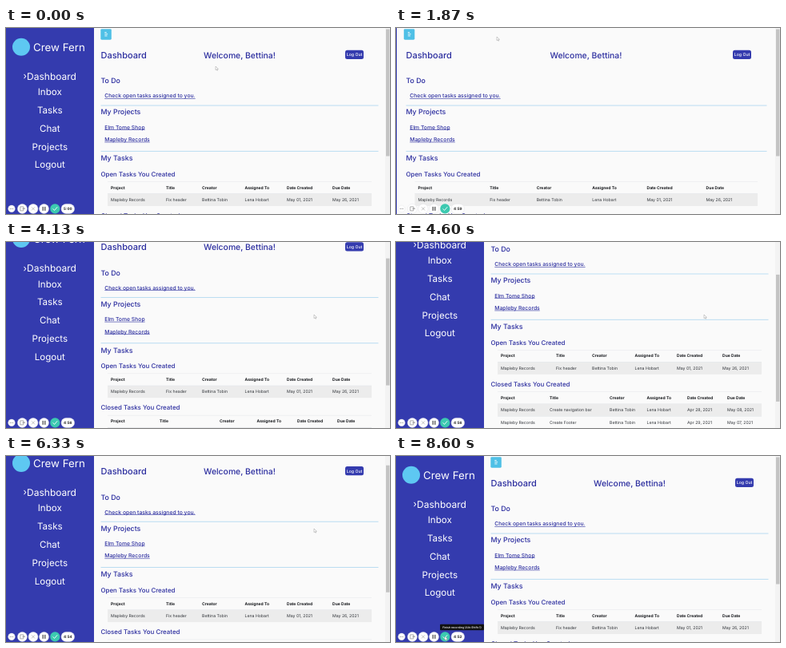
Recreate the animation shown at these times as an HTML page with a canvas. Size 480 by 233 pixels, loop 8670 ms.

```html
<!DOCTYPE html>
<html lang="en">
<head>
<meta charset="utf-8">
<title>Task dashboard</title>
<style>
  html, body { margin: 0; width: 100%; height: 100%; overflow: hidden; background: #fafafa; }
  canvas { display: block; width: 100vw; height: 100vh; }
</style>
</head>
<body>
<canvas></canvas>
<script>
const W = 480, H = 233, LOOP = 8670, SIDE = 110;
const BLUE = '#343bae', INK = '#2b2d9f', TEAL = '#3cc9b0', RULE = '#b4daf1';
const FONT = 'Inter, "Open Sans", sans-serif';
const canvas = document.querySelector('canvas');
const ctx = canvas.getContext('2d');

const me = 'Bettina Tobin', lena = 'Lena Hobart', ros = 'Rosalyn Tobin', shop = 'Mapleby Records';
const heads = ['Project', 'Title', 'Creator', 'Assigned To', 'Date Created', 'Due Date'];
const open = {
  y: 199.7, cols: [131, 200, 245, 298.5, 351, 408],
  rows: [[shop, 'Fix header', me, lena, 'May 01, 2021', 'May 26, 2021']]
};
const closed = {
  y: 252, cols: [131, 192, 267, 313.5, 364, 414],
  rows: [
    [shop, 'Create navigation bar', me, lena, 'Apr 28, 2021', 'May 08, 2021'],
    [shop, 'Create Footer', me, lena, 'Apr 29, 2021', 'May 07, 2021'],
    [shop, 'Home Page Link', me, ros, 'Apr 30, 2021', 'May 07, 2021'],
    ['Wisp Cafe', 'Carousel', me, ros, 'Apr 30, 2021', 'May 21, 2021'],
    [shop, 'Fonts', me, ros, 'Apr 30, 2021', 'May 14, 2021']
  ]
};

// Keys are [time, ...values]
const pointerKeys = [
  [0, 263, 50], [70, 263, 50], [1000, 165, 25], [1330, 127, 13], [1930, 127, 13],
  [2330, 17, 9], [2720, 17, 9], [3200, 386, 93], [7370, 386, 93], [8200, 62, 228]
];
const scrollKeys = [[3690, 0], [4600, 57], [5400, 103.5], [5470, 103.5], [6130, 22], [6220, 22], [6560, 0]];
const foldKeys = [[1490, 0], [1870, 1], [2370, 1], [2760, 0]];

const linear = u => u;
const smooth = u => u * u * (3 - 2 * u);
const mix = (a, b, u) => a + (b - a) * u;

function track(keys, t, ease) {
  if (t <= keys[0][0]) return keys[0].slice(1);
  for (let i = 1; i < keys.length; i++) {
    const a = keys[i - 1], b = keys[i];
    if (t < b[0]) {
      const u = ease((t - a[0]) / (b[0] - a[0]));
      return a.slice(1).map((v, k) => mix(v, b[k + 1], u));
    }
  }
  return keys[keys.length - 1].slice(1);
}

function text(s, x, y, size, color, weight = 400, align = 'left') {
  ctx.font = `${weight} ${size}px ${FONT}`;
  ctx.fillStyle = color;
  ctx.textAlign = align;
  ctx.fillText(s, x, y + size * 0.36);
}

function rect(x, y, w, h, color) {
  ctx.fillStyle = color;
  ctx.fillRect(x, y, w, h);
}

function pill(x, y, w, h, r, color, edge) {
  ctx.beginPath();
  ctx.roundRect(x, y, w, h, r);
  ctx.fillStyle = color;
  ctx.fill();
  if (edge) line(edge, 0.4);
}

function disc(x, y, r, color, edge) {
  pill(x - r, y - r, 2 * r, 2 * r, r, color, edge);
}

function line(color, width) {
  ctx.strokeStyle = color;
  ctx.lineWidth = width;
  ctx.stroke();
}

function path(points, color, width) {
  ctx.beginPath();
  points.forEach(([x, y], i) => i ? ctx.lineTo(x, y) : ctx.moveTo(x, y));
  line(color, width);
}

function heading(s, x, y, size) {
  text(s, x, y, size, INK, 500);
}

function link(s, x, y) {
  text(s, x, y, 6.8, INK, 500);
  rect(x, y + 3, ctx.measureText(s).width, 0.6, INK);
}

function table({ y, cols, rows }, fold) {
  const at = x => mix(x, 27.5 + (x - 131) * 1.3, fold);
  const left = mix(127, 23.5, fold), width = mix(457, 452, fold) - left;
  rect(left, y - 7.5, width, 0.5, '#e2e5e8');
  heads.forEach((s, i) => text(s, at(cols[i]), y, 5.05, '#15171b', 700));
  rows.forEach((row, r) => {
    const mid = y + 15.5 + r * 15.35;
    if (r % 2 === 0) rect(left, mid - 7.7, width, 15.4, '#ececec');
    rect(left, mid - 7.8, width, 0.5, '#dee2e6');
    row.forEach((s, i) => text(s, at(cols[i]), mid, 5.2, '#33363b'));
  });
}

function toggle(x) {
  pill(x, 1.2, 13.5, 13.5, 1.4, '#4fc0e6');
  for (const [dx, dy, w] of [[5, 5, 2.4], [5, 7.2, 3.8], [5, 9.4, 3.2]]) rect(x + dx, dy, w, 0.9, '#fff');
}

function page(fold) {
  const x = mix(118.5, 12.5, fold);
  const end = mix(465.5, 463.5, fold);
  const inset = mix(123.3, 17.3, fold);
  toggle(mix(118.3, 9.8, fold));
  heading('Dashboard', x, 33.8, 11);
  heading('Welcome, Bettina!', mix(247, 192.5, fold), 33.8, 10.4);
  const out = mix(424, 421, fold);
  pill(out, 27.8, 23, 11.2, 2.5, BLUE);
  text('Log Out', out + 11.5, 33.5, 5.2, '#fff', 500, 'center');

  heading('To Do', x, 66.2, 8.8);
  link('Check open tasks assigned to you.', inset, 85);
  rect(x, 96.6, end - x, 0.9, RULE);
  heading('My Projects', x, 105.3, 8.8);
  link('Elm Tome Shop', inset, 124.4);
  link(shop, inset, 139.7);
  rect(x, 153.9, end - x, 0.9, RULE);
  heading('My Tasks', x, 163.1, 8.8);
  heading('Open Tasks You Created', x, 182.8, 7.9);
  table(open, fold);
  heading('Closed Tasks You Created', x, 235.1, 7.9);
  table(closed, fold);
}

function sidebar(fold, scroll) {
  const width = mix(SIDE, 1, fold);
  ctx.save();
  ctx.beginPath();
  ctx.rect(0, 0, width, H);
  ctx.clip();
  rect(0, 0, width, H, BLUE);
  ctx.translate(width - SIDE, -scroll);
  disc(19, 23.7, 11, '#5ec8f2');
  text('Crew Fern', 34, 24.3, 13.3, '#fff');
  text('›', 21.5, 60, 11.5, '#fff');
  text('Dashboard', 57, 60.3, 12, '#fff', 400, 'center');
  ['Inbox', 'Tasks', 'Chat', 'Projects', 'Logout'].forEach((s, i) =>
    text(s, 54.8, 80.1 + i * 22.8, 11.6, '#fff', 400, 'center'));
  ctx.restore();
}

function toolbar(t) {
  const y = 226.4, gray = '#777', edge = '#dfdfe4';
  disc(7, y, 4.3, '#fff', edge);
  for (const dx of [-1.8, 0, 1.8]) disc(7 + dx, y, 0.5, gray);
  for (const x of [20.4, 34, 47.5]) disc(x, y, 6, '#fff', edge);
  ctx.beginPath();
  ctx.rect(17.8, y - 2.5, 4, 5);
  line(gray, 0.6);
  path([[20.5, y], [23.7, y], [22.5, y - 1.2]], gray, 0.6);
  path([[32, y - 2], [36, y + 2]], '#999', 0.6);
  path([[36, y - 2], [32, y + 2]], '#999', 0.6);
  rect(45.6, y - 2.5, 1.2, 5, '#444');
  rect(48.2, y - 2.5, 1.2, 5, '#444');
  disc(61.3, y, 6.1, TEAL);
  path([[58.5, y], [60.6, y + 2], [64.2, y - 2.2]], '#fff', 0.9);
  pill(69, y - 6, 16.6, 12, 6, '#fff', edge);
  const left = 300 - Math.floor(t / 1000);
  const clock = Math.floor(left / 60) + ':' + String(left % 60).padStart(2, '0');
  text(clock, 77.3, y, 4.6, '#222', 700, 'center');
  if (t >= 8270) {
    pill(55, 210.8, 55, 7.4, 1, '#111');
    text('Finish recording (Alt+Shift+1)', 82.5, 214.4, 3.5, '#fff', 500, 'center');
  }
}

function pointer([x, y]) {
  ctx.beginPath();
  [[0, 0], [0, 4.6], [1.1, 3.7], [1.9, 5.3], [2.7, 4.9], [2, 3.4], [3.4, 3.3]].forEach(([dx, dy], i) =>
    i ? ctx.lineTo(x - 1 + dx, y - 2 + dy) : ctx.moveTo(x - 1, y - 2));
  ctx.closePath();
  ctx.fillStyle = '#fff';
  ctx.fill();
  line('#999', 0.5);
}

function draw(t) {
  const [scroll] = track(scrollKeys, t, linear);
  const [fold] = track(foldKeys, t, smooth);
  rect(0, 0, W, H, '#fafafa');
  ctx.save();
  ctx.translate(0, -scroll);
  page(fold);
  ctx.restore();
  sidebar(fold, scroll);
  rect(474, 0, 6, H, '#f3f3f3');
  rect(475, 1.5 + scroll * 0.69, 4.5, 159, '#c3c3c3');
  toolbar(t);
  pointer(track(pointerKeys, t, smooth));
}

function resize() {
  const dpr = window.devicePixelRatio || 1;
  canvas.width = Math.round(innerWidth * dpr);
  canvas.height = Math.round(innerHeight * dpr);
  ctx.setTransform(canvas.width / W, 0, 0, canvas.height / H, 0, 0);
  ctx.textBaseline = 'alphabetic';
  ctx.textRendering = 'geometricPrecision';
}

addEventListener('resize', resize);
resize();
const start = performance.now();
function tick() {
  draw((performance.now() - start) % LOOP);
  requestAnimationFrame(tick);
}
tick();
</script>
</body>
</html>
```
